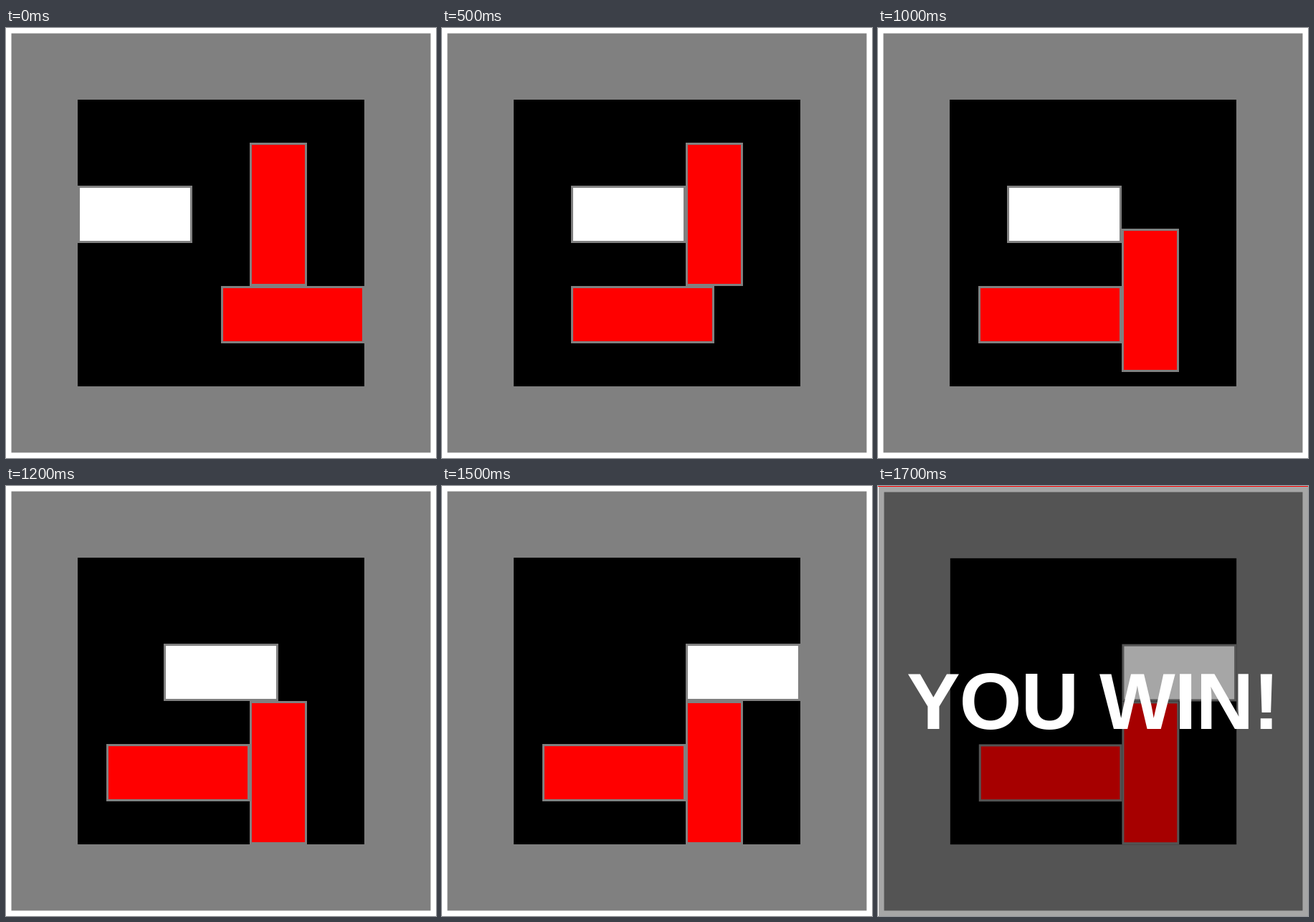
Write an HTML page that moves like this. It is 600 by 600 pixels and loops after 2 s.

```html
<!DOCTYPE html>
<html lang="en">
<head>
<meta charset="utf-8">
<title>Sliding blocks</title>
<style>
  html, body { margin: 0; width: 100%; height: 100%; overflow: hidden; background: #fff; }
  svg { display: block; width: 100vw; height: 100vh; }
  .block { stroke: #808080; stroke-width: 3; }
  text { font: bold 112px Arial, "Liberation Sans", sans-serif; font-kerning: none; letter-spacing: -1.2px; fill: #fff; }
</style>
</head>
<body>
<svg viewBox="0 0 600 600">
  <rect width="600" height="600" fill="#fff"/>
  <g id="scene">
    <rect width="600" height="600" fill="#fff"/>
    <rect x="7.5" y="7.5" width="585" height="585" fill="#808080"/>
    <rect x="100" y="100" width="400" height="400"/>
    <rect id="goal" class="block" y="221.5" width="157" height="77" fill="#fff"/>
    <rect id="wide" class="block" y="361.5" width="197" height="77" fill="#f00"/>
    <rect id="tall" class="block" x="341.5" width="77" height="197" fill="#f00"/>
    <rect id="shade" width="600" height="600"/>
  </g>
  <rect id="edge" width="600" height="1" fill="#f00"/>
  <text id="win" x="40" y="339">YOU WIN!</text>
</svg>
<script>
const LOOP = 2000, TICK = 100, CELL = 40;
const el = id => document.getElementById(id);
const set = (id, name, value) => el(id).setAttribute(name, value);

// Moves made by the given tick, when one is made per tick from `first` on
const moves = (tick, first, count) => Math.max(0, Math.min(count, tick - first + 1));

function draw(ms) {
  const tick = Math.floor(ms % LOOP / TICK);
  const goalX = 100 + CELL * (moves(tick, 1, 2) + moves(tick, 12, 4));
  const wideX = 300 - CELL * moves(tick, 3, 4);
  const tallY = Math.min(300, 160 + CELL * moves(tick, 8, 4));
  set("goal", "x", goalX + 1.5);
  set("wide", "x", wideX + 1.5);
  set("tall", "y", tallY + 1.5);

  const fade = moves(tick, 16, 2) / 2;
  const done = fade === 1;
  set("shade", "opacity", 0.35 * fade);
  set("win", "opacity", fade);
  set("edge", "opacity", done ? 1 : 0);
  set("scene", "transform", done ? `translate(1 1) scale(${599 / 600})` : "");
}

const start = performance.now();
function loop() {
  draw(performance.now() - start);
  requestAnimationFrame(loop);
}
draw(0);
requestAnimationFrame(loop);
</script>
</body>
</html>
```
